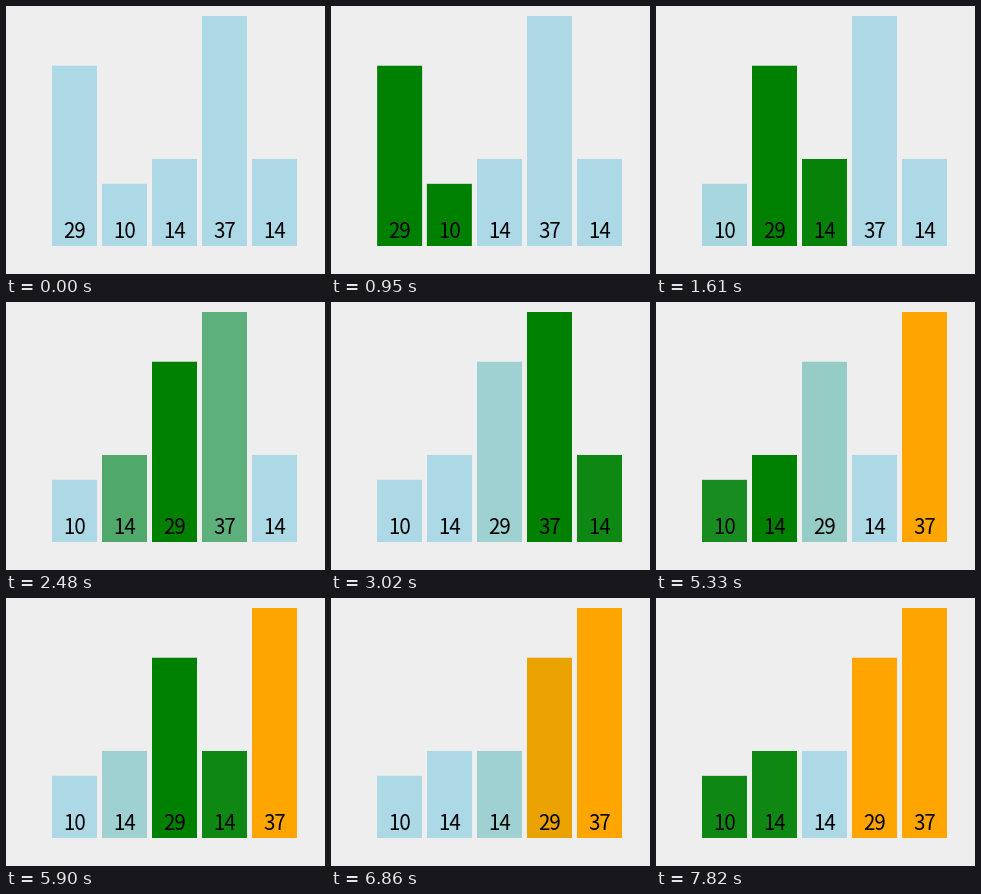
Recreate the animation shown at these times as a matplotlib script. Size 319 px wide and 268 px high, loop 8 s.

```python
import matplotlib.pyplot as plt
from matplotlib.animation import FuncAnimation
from matplotlib.colors import to_rgb
from matplotlib.patches import Rectangle
import numpy as np

W, H, DPI = 319, 268, 64
LOOP, TICK = 8000, 20
VALUES = [29, 10, 14, 37, 14]
LEFT, PITCH, BAR_W, BASE, MAX_H = 46, 50, 45, 240, 230
START, BEAT, DURATION = 438, 480, 250
IDLE, ACTIVE, DONE = (np.array(to_rgb(c)) for c in ("lightblue", "green", "orange"))


def ease(t):
    """Cubic in-out."""
    t = min(max(t, 0), 1)
    return 4 * t**3 if t < 0.5 else 1 - 4 * (1 - t) ** 3


def bubble_sort():
    """Return lists of (time, bar, colour) and (time, bar, slot)."""
    paints, moves = [], []
    order = list(range(len(VALUES)))
    time = START
    for last in range(len(order) - 1, 0, -1):
        for j in range(last):
            if j:
                paints.append((time, order[j - 1], IDLE))
            else:
                paints.append((time, order[0], ACTIVE))
            paints.append((time, order[j + 1], ACTIVE))
            time += BEAT
            if VALUES[order[j]] > VALUES[order[j + 1]]:
                order[j], order[j + 1] = order[j + 1], order[j]
                moves += [(time, order[k], k) for k in (j, j + 1)]
                time += BEAT
        paints.append((time, order[last - 1], IDLE))
        paints.append((time, order[last], DONE))
        time += 2 * BEAT
    return paints, moves


def state(events, bar, value, now):
    """Follow a bar's eased transitions up to the given time."""
    for time, who, goal in events:
        if who == bar and time < now:
            value = value + (goal - value) * ease((now - time) / DURATION)
    return value


PAINTS, MOVES = bubble_sort()

fig = plt.figure(figsize=(W / DPI, H / DPI), dpi=DPI, facecolor="#eeeeee")
ax = fig.add_axes([0, 0, 1, 1])
ax.set(xlim=(0, W), ylim=(H, 0))
ax.axis("off")

bars, labels = [], []
for i, v in enumerate(VALUES):
    height = MAX_H * v / max(VALUES)
    bar = Rectangle((LEFT + PITCH * i, BASE - height), BAR_W, height,
                    linewidth=0, snap=False, zorder=2 * i + 1)
    bars.append(ax.add_patch(bar))
    labels.append(ax.text(0, 232, str(v), ha="center", va="baseline",
                          family="Noto Sans CJK JP", fontsize=20.5 * 72 / DPI,
                          color="black", zorder=2 * i + 2))


def draw(frame):
    now = frame * TICK
    for i, (bar, label) in enumerate(zip(bars, labels)):
        x = LEFT + PITCH * state(MOVES, i, i, now)
        bar.set_x(x)
        bar.set_facecolor(state(PAINTS, i, IDLE, now))
        label.set_x(x + BAR_W / 2)
    return bars + labels


anim = FuncAnimation(fig, draw, frames=LOOP // TICK, interval=TICK,
                     init_func=lambda: draw(0), repeat=True, repeat_delay=0)
plt.show()
```
